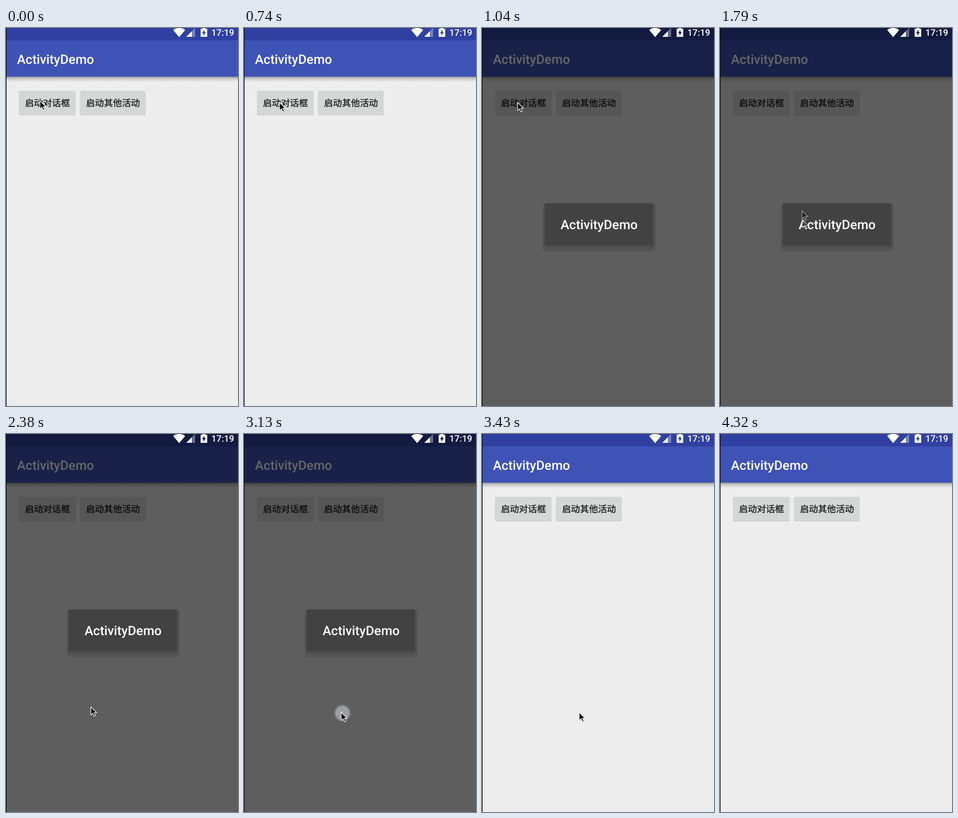
Animation, 422 px wide and 686 px high, one loop 4.61 s. Source, as an HTML page:

```html
<!DOCTYPE html>
<html lang="zh-CN">
<head>
<meta charset="utf-8">
<title>ActivityDemo</title>
<style>
  html, body { margin: 0; width: 100%; height: 100%; overflow: hidden; background: #ededed; }
  svg { display: block; width: 422px; height: 686px; }
  text { text-rendering: geometricPrecision; }
  .title { font: 500 23.44px Roboto, sans-serif; fill: #fff; }
  .clock { font: 500 16.4px Roboto, sans-serif; fill: #fff; }
  .label { font: 500 16.4px "Noto Sans CJK SC", "Noto Sans CJK", sans-serif; fill: #161616; stroke: #161616; stroke-width: .3px; }
</style>
</head>
<body>
<svg viewBox="0 0 422 686" xmlns="http://www.w3.org/2000/svg">
  <defs>
    <linearGradient id="fade" x2="0" y2="1">
      <stop offset="0" stop-opacity=".36"/>
      <stop offset=".45" stop-opacity=".13"/>
      <stop offset="1" stop-opacity="0"/>
    </linearGradient>
    <g id="arrow">
      <path d="M1.2 2.5V17.2L4.7 14 7.2 19.6 10 18.4 7.6 13H12.2Z" opacity=".2"/>
      <path d="M.8 1.2V15.8L4.2 12.6 6.7 18.2 9.2 17.1 6.8 11.7H11.2Z" stroke="#fff" stroke-width="1.1"/>
    </g>
  </defs>

  <g id="app">
    <rect width="422" height="686" fill="#ededed"/>
    <rect y="88" width="422" height="10" fill="url(#fade)"/>
    <rect y="22" width="422" height="66.3" fill="#3f52b6"/>
    <rect width="422" height="22.5" fill="#3040a0"/>
    <text class="title" x="20" y="65">ActivityDemo</text>
    <g id="buttons"></g>
  </g>
  <rect id="dim" width="422" height="686"/>

  <g id="status" fill="#fff">
    <path d="M304 3.6Q315-4 326 3.6L315 16.6Z"/>
    <path d="M328 16V15.8L344-.2V16Z" opacity=".35"/>
    <path d="M328 16 338 6V16Z"/>
    <path fill-rule="evenodd" d="M354 1.5H357.5V0H362.5V1.5H366V16H354ZM361 3 356.5 9.5H359.2V14L363.6 7.6H361Z"/>
    <text class="clock" x="373.5" y="14">17:19</text>
  </g>

  <g id="dialog">
    <rect x="110.5" y="317" width="205.5" height="88.5" rx="8" opacity=".1"/>
    <rect x="113" y="318.5" width="199.5" height="79.5" rx="4" opacity=".1"/>
    <rect x="114.5" y="319" width="196.5" height="75" rx="2" fill="#424242"/>
    <text class="title" x="143" y="365">ActivityDemo</text>
  </g>

  <g id="touch">
    <circle r="14" fill="none" stroke="#8484a6" stroke-width="2.4" opacity=".6"/>
    <circle r="12.8" fill="#fff" opacity=".4"/>
  </g>
  <use id="ghost" href="#arrow"/>
  <use id="cursor" href="#arrow"/>
  <rect width="1" height="686"/>
</svg>
<script>
const LOOP = 4610, BEAT = 149, LEAD = 8;
const $ = id => document.getElementById(id);

function button(x, width, label) {
  return `<rect x="${x - .4}" y="114.6" width="${width + .8}" height="43.9" rx="2.5" opacity=".14"/>
    <rect x="${x}" y="114" width="${width}" height="43.3" rx="2" fill="#d5d7d6"/>
    <text class="label" x="${x + 10.4}" y="142">${label}</text>`;
}
$('buttons').innerHTML = button(24, 102, '启动对话框') + button(135, 118.7, '启动其他活动');

const move = (el, x, y) => el.setAttribute('transform', `translate(${x} ${y})`);
const alpha = (el, value) => el.setAttribute('opacity', value);
const within = (b, from, to) => b >= from && b < to;

// eased progress from 0 to 1 between two beats
function glide(b, from, to) {
  const u = Math.min(1, Math.max(0, (b - from) / (to - from)));
  return Math.sin(u * Math.PI / 2) ** 1.5;
}

// settle on the button, sweep down, drift right, leave at the bottom
function pointer(b) {
  const settle = glide(b, 0, 1), drift = glide(b, 15.5, 18);
  return {
    x: 61 + 3 * settle + 85 * glide(b, 10, 12) + 27 * drift + 189 * glide(b, 24.3, 27.4),
    y: 131 + 3 * settle + 358 * glide(b, 10, 14) + 12 * drift + 171 * glide(b, 24.8, 27.8)
  };
}

function draw(t) {
  const b = Math.floor((t + LEAD) / BEAT);

  // a fast pointer shows a second, slightly older image
  const now = pointer(b), old = pointer(b - .13);
  const fast = Math.hypot(now.x - old.x, now.y - old.y) > 5;
  const visible = b < 29;
  move($('cursor'), now.x, now.y);
  alpha($('cursor'), visible ? (fast ? .6 : 1) : 0);
  move($('ghost'), old.x, old.y);
  alpha($('ghost'), visible && fast ? .5 : 0);

  const closing = glide(b, 20.9, 22.45);
  alpha($('dim'), .6 * (glide(b, 5.62, 7) - glide(b, 21.3, 23)));
  alpha($('dialog'), glide(b, 5.3, 6.65) - closing);
  move($('dialog'), 0, 3 * closing);

  move($('touch'), now.x + 3, now.y + 2.5);
  alpha($('touch'), within(b, 2, 4) || within(b, 21, 23) ? 1 : 0);
}

const start = performance.now();
function tick() {
  draw((performance.now() - start) % LOOP);
  requestAnimationFrame(tick);
}
tick();
</script>
</body>
</html>
```
